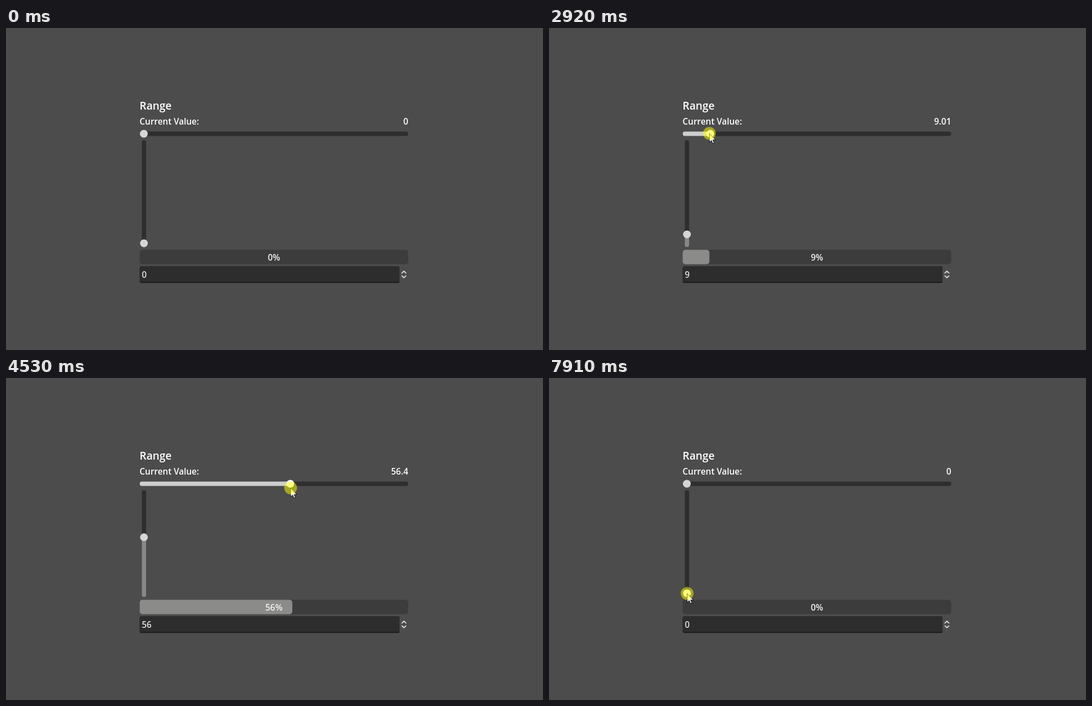
Animation of 966x580 px, one loop 8 s. Source, as an HTML page with a canvas:

```html
<!DOCTYPE html>
<html lang="en">
<head>
<meta charset="utf-8">
<title>Range</title>
<style>
html, body { margin: 0; width: 100%; height: 100%; overflow: hidden; background: #4c4c4c; }
canvas { display: block; }
</style>
</head>
<body>
<canvas id="stage" width="966" height="580"></canvas>
<script>
const ctx = document.getElementById('stage').getContext('2d');
const LOOP = 8000, PRESS = 2230, RELEASE = 6190, PRESS_2 = 7910;
const FONT = '"Open Sans", "Noto Sans", sans-serif';

// time, pointer x, pointer y, range value
const keys = [
  [430, 634, 605, 0],
  [500, 622, 566, 0],
  [1270, 320, 198.5, 0],
  [1830, 246.5, 188, 0],
  [2390, 246.5, 188, 0],
  [3480, 368, 193, 26.03],
  [4530, 512, 198, 56.4],
  [4670, 515, 198.5, 57],
  [4940, 515, 198.5, 57],
  [5490, 332.5, 198.5, 20],
  [5780, 241.5, 201, 0],
  [5990, 223.5, 204.5, 0],
  [6190, 223.5, 204.5, 0],
  [6960, 231, 331, 0],
  [7450, 248.5, 388, 0],
  [LOOP, 248.5, 388, 0]
];

const bursts = [500, 2430, 5000, 5570, 6190];
function stepTime(t) {
  const start = bursts.filter(b => b <= t).pop() ?? 0;
  return start + Math.floor((t - start) / 70) * 70;
}

function slope(i, k) {
  if (i < 1 || i >= keys.length - 1) return 0;
  const rate = j => (keys[j + 1][k] - keys[j][k]) / (keys[j + 1][0] - keys[j][0]);
  const a = rate(i - 1), b = rate(i);
  return a * b > 0 ? 2 * a * b / (a + b) : 0;
}

// Monotone cubic interpolation of column k
function track(t, k) {
  let i = 0;
  while (i < keys.length - 2 && t >= keys[i + 1][0]) i++;
  const [a, b] = [keys[i], keys[i + 1]];
  const d = b[0] - a[0], p = Math.max(0, (t - a[0]) / d), q = 1 - p;
  return a[k] * (1 + 2 * p) * q * q + b[k] * p * p * (3 - 2 * p)
    + d * p * q * (slope(i, k) * q - slope(i + 1, k) * p);
}

function box(x, y, w, h, r, color) {
  ctx.fillStyle = color;
  ctx.beginPath();
  ctx.roundRect(x, y, w, h, r);
  ctx.fill();
}

function disc(x, y, r, color) {
  ctx.fillStyle = color;
  ctx.beginPath();
  ctx.arc(x, y, r, 0, 2 * Math.PI);
  ctx.fill();
}

function text(s, x, y, align = 'left', color = '#fff', size = 15.46) {
  ctx.font = `600 ${size}px ${FONT}`;
  ctx.textAlign = align;
  ctx.fillStyle = color;
  ctx.fillText(s, x, y);
}

function pointer(x, y) {
  ctx.save();
  ctx.translate(x, y);
  const arrow = new Path2D('M0 .5V16.2L3.7 12.8L6.1 18.2L8.6 17.1L6.3 11.9H11Z');
  ctx.fillStyle = '#fff';
  ctx.strokeStyle = '#111';
  ctx.fill(arrow);
  ctx.stroke(arrow);
  ctx.restore();
}

function sliders(v, t) {
  const x = 248 + 4.67 * v, y = 387.8 - 1.79 * v;
  const hot = t >= 1410 && t < PRESS_2, hotV = t >= 7240;
  box(240.5, 186.5, 483, 8, 4, '#2e2e2e');
  box(240.5, 186.5, x - 240.5, 8, 4, hot ? '#cfcecf' : '#888');
  disc(x, 190.5, 7, hot ? '#fff' : '#d6d6d6');
  box(244.3, 202, 7.8, 193, 4, '#2e2e2e');
  box(244.3, y, 7.8, 394.6 - y, 4, hotV ? '#cfcecf' : '#888');
  disc(248.2, y, 7, hotV ? '#fff' : '#d6d6d6');
}

function progress(v) {
  box(240.5, 399.5, 483, 26, 5, '#3c3c3c');
  if (v > 0) box(240.5, 399.5, 5 + 4.78 * v, 26, 5, '#8b8b89');
  text(Math.round(v) + '%', 482, 418.5, 'center', '#f2f2f2');
}

function spinBox(v) {
  box(240.5, 429.3, 467.5, 30, 3, '#1b1b1b');
  box(240.5, 429.3, 467.5, 28, [3, 3, 1, 1], '#2d2d2d');
  text(Math.round(v), 244.3, 450, 'left', '#e0e0e0');
  ctx.strokeStyle = '#d6d6d6';
  ctx.lineWidth = 1.9;
  ctx.lineCap = ctx.lineJoin = 'round';
  ctx.stroke(new Path2D('M712.2 441.4L715.8 438L719.4 441.4M712.2 446.4L715.8 449.8L719.4 446.4'));
  ctx.lineWidth = 1;
}

function draw(time) {
  const t = time % LOOP, s = stepTime(t);
  const x = track(s, 1), y = track(s, 2);
  const v = +track(s, 3).toFixed(2);
  ctx.fillStyle = '#4c4c4c';
  ctx.fillRect(0, 0, 966, 580);
  text('Range', 240.3, 147, 'left', '#fff', 19.32);
  text('Current Value:', 240.3, 174);
  text(v, 723.5, 174, 'right');
  sliders(v, t);
  progress(v);
  spinBox(v);
  if (t >= 500) pointer(x, y);
  if (t >= PRESS && t < RELEASE || t >= PRESS_2) disc(x, y, 11.5, 'rgba(255,255,0,.5)');
}

const begin = performance.now();
function frame() {
  draw(performance.now() - begin);
  requestAnimationFrame(frame);
}
frame();
</script>
</body>
</html>
```
